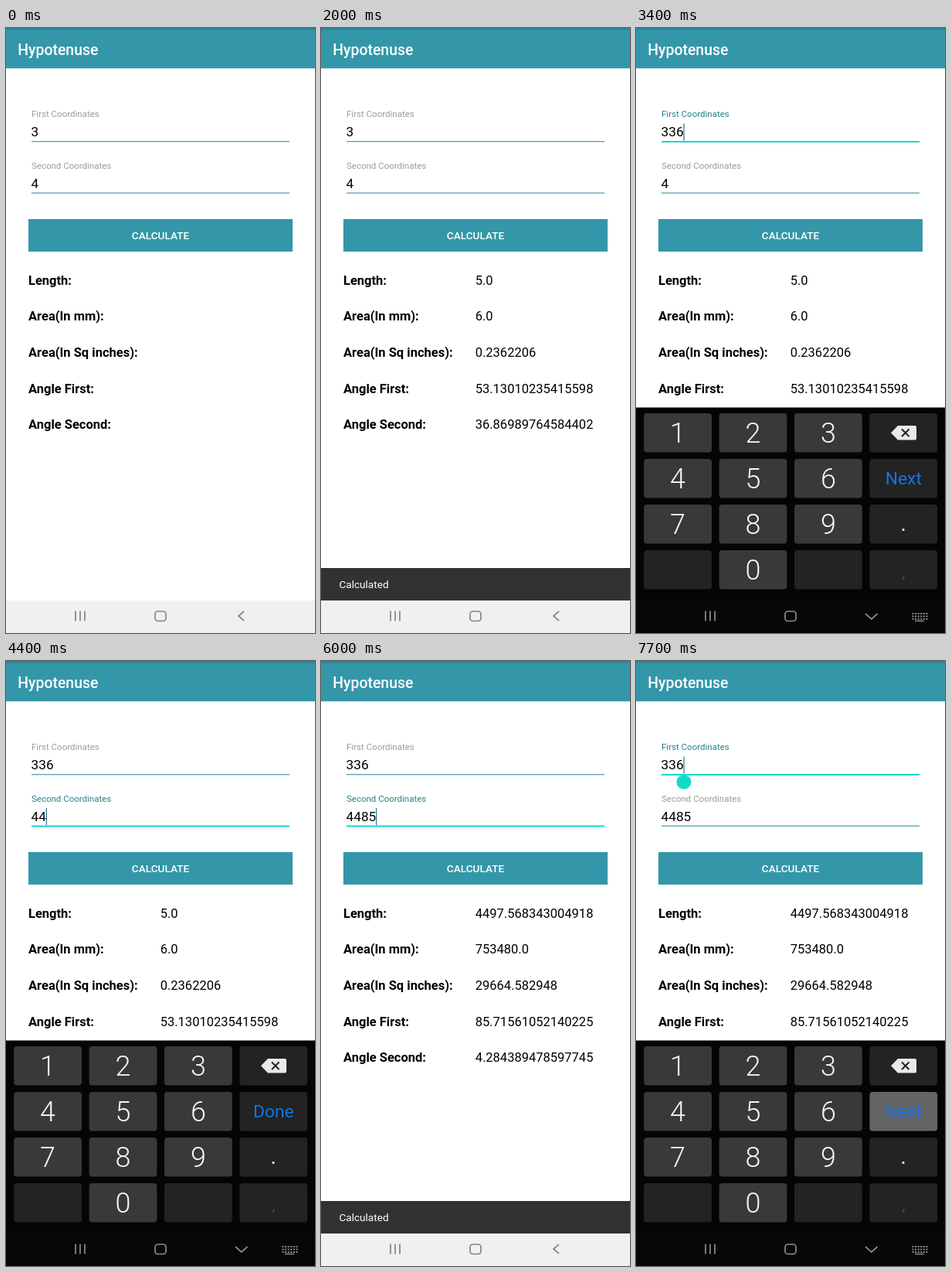
Animation, 400 px wide and 782 px high, one loop 8000 ms. Source, as an HTML page:

```html
<!DOCTYPE html>
<html lang="en">
<head>
<meta charset="utf-8">
<title>Hypotenuse</title>
<style>
  html, body { margin: 0; width: 100%; height: 100%; overflow: hidden; background: #fff; }
  svg { display: block; font: 16.5px Roboto, sans-serif; }
  text { white-space: pre; }
</style>
</head>
<body>
<svg id="stage" width="400" height="782" viewBox="0 0 400 782"></svg>
<script>
const LOOP = 8000, STEP = 100, BLINK = 500;
const TEAL = '#3397a9', ACCENT = '#12dacb';
const stage = document.getElementById('stage');

// Each list holds [start time, value]; the latest started entry counts.
const focusAt = [[0, ''], [2400, 'first'], [3800, 'second'], [6600, 'first']];
const firstAt = [[0, '3'], [3200, '33'], [3400, '336']];
const secondAt = [[0, '4'], [4200, '44'], [4500, '448'], [4700, '4485']];
const pressAt = [[0, ''], [3100, '3'], [3200, ''], [3300, '6'], [3400, ''], [3700, 'Next'], [3800, ''],
  [4100, '4'], [4200, ''], [4600, '5'], [4700, ''], [7700, 'Next']];
const handleAt = [[0, false], [2400, true], [3200, false], [6600, true]];
const resultsAt = [
  [0, ['', '', '', '', '']],
  [1000, ['5.0', '6.0', '0.2362206', '53.13010235415598', '36.86989764584402']],
  [5200, ['4497.568343004918', '753480.0', '29664.582948', '85.71561052140225', '4.284389478597745']]
];
const labels = ['Length:', 'Area(In mm):', 'Area(In Sq inches):', 'Angle First:', 'Angle Second:'];

const last = (list, t) => list.filter(([start]) => start <= t).pop();
const at = (list, t) => last(list, t)[1];
const rect = (x, y, w, h, fill, more = '') =>
  `<rect x="${x}" y="${y}" width="${w}" height="${h}" fill="${fill}" ${more}/>`;
const text = (x, y, s, fill = '#000', more = '') => `<text x="${x}" y="${y}" fill="${fill}" ${more}>${s}</text>`;
const line = (d, stroke, width = 1.7) =>
  `<path d="${d}" fill="none" stroke="${stroke}" stroke-width="${width}"/>`;

function field(y, label, value, focused, cursorOn, handle) {
  const end = 33 + value.length * 9.65;
  let out = text(33, y, label, focused ? '#24838c' : '#9b9b9b', 'font-size="11.5"')
    + text(32.6, y + 25, value, '#000', 'font-size="17.2"')
    + (focused ? rect(33, y + 31, 334, 2, ACCENT) : rect(33, y + 31.2, 334, 1.1, '#398ea3'));
  if (focused && cursorOn) out += rect(end - .6, y + 8.5, 1.3, 22, '#347f98');
  if (focused && handle)
    out += `<path d="M${end} ${y + 31.5}l6.8 3.2a9.5 9.5 0 1 1 -13.6 0z" fill="${ACCENT}"/>`;
  return out;
}

function fields(t) {
  const focus = at(focusAt, t);
  const edits = [focusAt, firstAt, secondAt].map(list => last(list, t)[0]);
  const on = Math.floor((t - Math.max(...edits)) / BLINK) % 2 === 0;
  return field(115, 'First Coordinates', at(firstAt, t), focus === 'first', on, at(handleAt, t))
    + field(181.5, 'Second Coordinates', at(secondAt, t), focus === 'second', on, false);
}

function button(t) {
  const age = t - (t < 5200 ? 900 : 5200);
  const glow = age >= 0 && age < 300 ? .18 * (1 - age / 300) : 0;
  return rect(29, 247, 342, 42, TEAL) + rect(29, 247, 342, 42, '#fff', `opacity="${glow}"`)
    + text(200, 273, 'CALCULATE', '#fff', 'font-size="13.6" font-weight="500" text-anchor="middle"');
}

function results(t) {
  const values = at(resultsAt, t);
  return labels.map((label, i) => {
    const y = 331.6 + 46.65 * i;
    return text(29, y, label, '#000', 'font-weight="700"') + text(199.7, y, values[i]);
  }).join('');
}

function snackbar(t) {
  const p = Math.min(1, (t - (t < 5200 ? 1000 : 5250)) / 250);
  if (p <= 0) return '';
  const y = 698 + 42 * (1 - p) ** 3;
  return rect(0, y, 400, 42, '#323232') + text(23.4, y + 26.3, 'Calculated', '#fff', 'font-size="13.6"');
}

// Distance of the keyboard below its resting place, or null while closed.
function keyboardDrop(t) {
  if (t >= 6600) return 292 * Math.exp((6600 - t) / 45);
  if (t < 2400 || t >= 5400) return null;
  return t < 5200 ? 292 * Math.exp((2380 - t) / 45) : 292 * ((t - 5200) / 200) ** 2;
}

function keyboard(t, drop) {
  const pressed = at(pressAt, t);
  const action = at(focusAt, t) === 'second' ? 'Done' : 'Next';
  const keys = ['1', '2', '3', 'del', '4', '5', '6', action, '7', '8', '9', '.', '', '0', '', ','];
  const faces = keys.map((key, i) => {
    const x = 10.2 + 97.4 * (i % 4), y = 498 + 59 * Math.floor(i / 4), cx = x + 43.9;
    const digit = /^\d$/.test(key);
    const fill = key && key === pressed ? '#646464' : digit ? '#393939' : '#232323';
    const face = rect(x, y, 87.8, 50.5, fill, 'rx="4"');
    if (key === 'del')
      return face + `<path d="M330 ${y + 25.3}l9-9.3h22q2 0 2 2v14.600q0 2-2 2h-22z" fill="#e9e9e9"/>`
        + line(`M344 ${y + 20.5}l9.500 9.500m0-9.500l-9.500 9.500`, '#222', 2);
    const [fg, size, weight, dy] = digit ? ['#f6f6f6', 36, 300, 38]
      : key === action ? ['#1374e8', 22.8, 400, 33]
      : key === ',' ? ['#484848', 22, 400, 35] : ['#f6f6f6', 28, 400, 34];
    return face + text(cx, y + dy, key, fg,
      `font-size="${size}" font-weight="${weight}" text-anchor="middle"`);
  }).join('');
  return `<g transform="translate(0 ${drop})">${rect(0, 490.5, 400, 292, '#050505')}${faces}</g>`;
}

function navigation(dark) {
  const ink = dark ? '#8c8c8c' : '#858585';
  let out = rect(0, 740, 400, 42, dark ? '#070707' : '#f0f0f0')
    + line('M90 753.500v13m6-13v13m6-13v13', ink)
    + rect(193, 754, 14, 12.5, 'none', `rx="3.5" stroke="${ink}" stroke-width="1.7"`);
  if (!dark) return out + line('M308 754l-7 6 7 6', ink);
  out += line('M297 757l7.800 7 7.800-7', ink);
  for (const y of [757, 760.5, 764])
    out += `<path d="M357.500 ${y}h20" stroke="${ink}" stroke-width="1.8" stroke-dasharray="2 1.600"/>`;
  return out + line('M361 766.500h12', ink, 1.4);
}

function render(t) {
  const drop = keyboardDrop(t), open = drop !== null;
  stage.innerHTML = rect(0, 0, 400, 782, '#fff')
    + rect(0, 0, 400, 52, TEAL) + rect(0, 0, 400, 2.5, '#2b8597') + rect(0, 52, 400, 1, '#dcebee')
    + text(15.3, 35, 'Hypotenuse', '#fff', 'font-size="19.4" font-weight="500"')
    + fields(t) + button(t) + results(t) + snackbar(t)
    + navigation(open) + (open ? keyboard(t, drop) + navigation(open) : '');
}

const begin = performance.now();
let shown = -1;
function tick() {
  const t = Math.floor((performance.now() - begin) % LOOP / STEP) * STEP;
  if (t !== shown) render(shown = t);
  requestAnimationFrame(tick);
}
tick();
</script>
</body>
</html>
```
